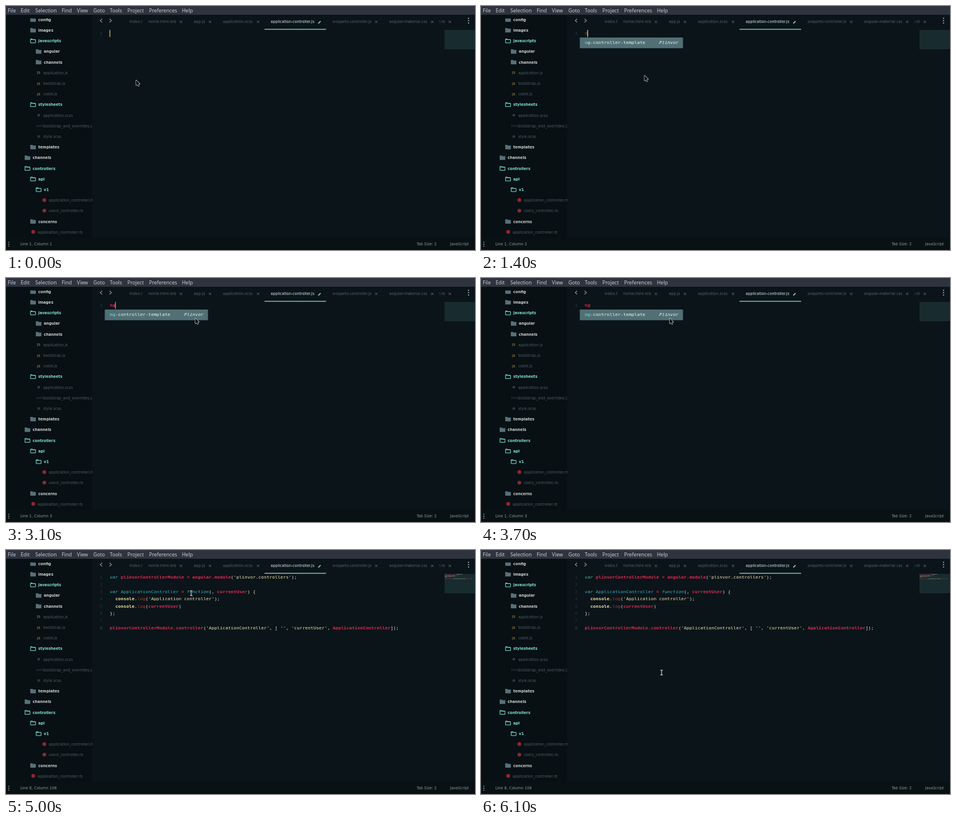
An HTML page with a canvas that plays this animation: 800x418 px, repeating every 6.2 s.

```html
<!DOCTYPE html>
<html lang="en">
<head>
<meta charset="utf-8">
<title>Editor snippet</title>
<style>
html, body { margin: 0; width: 100%; height: 100%; overflow: hidden; background: #0b1419; }
canvas { display: block; width: 800px; height: 418px; }
</style>
</head>
<body>
<canvas id="stage" width="800" height="418"></canvas>
<script>
const ctx = document.getElementById('stage').getContext('2d');
const LOOP = 6200;
const TYPE_N = 1400, TYPE_G = 1500, EXPAND = 4600;
const UI = '"DejaVu Sans", sans-serif';
const MENU = '"Noto Sans", sans-serif';
const MONO = '"DejaVu Sans Mono", monospace';
const CODE_X = 177, CODE_Y = 49.4, LINE = 12.3, CHAR = 4.695;
const TEAL = '#80e0cc', MUTED = '#505e63', LABEL = '#c9d0d1';

function rect(x, y, w, h, color) {
  ctx.fillStyle = color;
  ctx.fillRect(x, y, w, h);
}

function dot(x, y, r, color) {
  ctx.fillStyle = color;
  ctx.beginPath();
  ctx.arc(x, y, r, 0, Math.PI * 2);
  ctx.fill();
}

function path(points, color, width = 1, closed = false) {
  ctx.strokeStyle = color;
  ctx.lineWidth = width;
  ctx.beginPath();
  points.forEach(([x, y]) => ctx.lineTo(x, y));
  if (closed) ctx.closePath();
  ctx.stroke();
}

// Type is set at ten times its size and scaled back, so advances stay fractional.
// The tiny turn switches off hinting and keeps the true x-height and baseline.
function text(str, x, y, color, size, family = UI, style = '') {
  ctx.save();
  ctx.translate(x, y);
  ctx.rotate(0.0004);
  ctx.scale(0.1, 0.1);
  ctx.font = `${style} ${size * 10}px ${family}`;
  ctx.fillStyle = color;
  ctx.fillText(str, 0, 0);
  ctx.restore();
}

function clipped(x, y, w, h, draw) {
  ctx.save();
  ctx.beginPath();
  ctx.rect(x, y, w, h);
  ctx.clip();
  draw();
  ctx.restore();
}

function code(str, x, y, color, style) {
  text(str, x, y, color, 7.8, MONO, style);
}

/* ---------- menu, sidebar, tabs ---------- */

const menu = [['File', 3], ['Edit', 25], ['Selection', 50], ['Find', 95], ['View', 121],
  ['Goto', 149], ['Tools', 177], ['Project', 207], ['Preferences', 244], ['Help', 300]];

function drawMenu() {
  rect(0, 0, 800, 15, '#2e333e');
  menu.forEach(([s, x]) => text(s, x, 11, '#c8ccd4', 8.6, MENU));
}

// kind, label, label x
const tree = [
  ['dir', 'config', 55], ['dir', 'images', 55], ['open', 'javascripts', 55],
  ['dir', 'angular', 64.5], ['dir', 'channels', 64.5],
  ['js', 'application.js', 63.5], ['js', 'bootstrap.js', 63.5], ['js', 'cable.js', 63.5],
  ['open', 'stylesheets', 55], ['scss', 'application.scss', 63.5],
  ['css', 'bootstrap_and_overrides.css', 63.5], ['scss', 'style.scss', 63.5],
  ['dir', 'templates', 55], ['dir', 'channels', 45.5], ['open', 'controllers', 45.5],
  ['open', 'api', 55], ['open', 'v1', 64.5],
  ['rb', 'application_controller.rb', 73], ['rb', 'users_controller.rb', 73],
  ['dir', 'concerns', 55], ['rb', 'application_controller.rb', 54]
];

function folder(x, y, open) {
  if (open) {
    path([[x + .5, y - 3.3], [x + 3.6, y - 3.3], [x + 4.6, y - 2.2], [x + 9, y - 2.2],
      [x + 9, y + 3.3], [x + .5, y + 3.3]], TEAL, 1, true);
    rect(x + 1, y - 2.6, 7.6, .9, TEAL);
  } else {
    rect(x, y - 3.8, 4.2, 2, '#58727a');
    rect(x, y - 2.7, 9.5, 6.4, '#58727a');
  }
}

const icons = {
  dir: (x, y) => folder(x - 13.6, y, false),
  open: (x, y) => folder(x - 13.6, y, true),
  js: (x, y) => text('JS', x - 10.6, y + 2, '#c09a55', 6, UI),
  scss: (x, y) => dot(x - 7.6, y, 2.4, '#2c393e'),
  css: (x, y) => text('{css}', x - 12.4, y + 1.4, '#4a585d', 4.4, UI),
  rb: (x, y) => dot(x - 7.6, y - .4, 3.2, '#922538')
};

function drawSidebar() {
  rect(0, 15, 147, 382, '#081013');
  clipped(0, 21.6, 147, 376, () => tree.forEach(([kind, label, x], i) => {
    const y = 23.4 + i * 18.2;
    const isDir = kind === 'dir' || kind === 'open';
    icons[kind](x, y);
    text(label, x, y + 2.4, kind === 'open' ? TEAL : isDir ? LABEL : MUTED, 6.35, UI, isDir ? 'bold' : '');
  }));
}

const tabs = [['home.html.erb', 243, 298.5], ['app.js', 320.5, 348], ['application.scss', 370, 430],
  ['snippets-controller.js', 557, 631.5], ['angular-material.css', 653.5, 727]];

function cross(x) {
  path([[x - 2, 25.2], [x + 2, 29.2]], '#64757b', .9);
  path([[x + 2, 25.2], [x - 2, 29.2]], '#64757b', .9);
}

function drawTabs() {
  const tab = (s, x, color = '#52646b') => text(s, x, 29.4, color, 6.38);
  path([[164, 21.8], [160.8, 25], [164, 28.2]], '#8b999d', 1.2);
  path([[176.6, 21.8], [179.8, 25], [176.6, 28.2]], '#8b999d', 1.2);
  clipped(211, 18, 21.5, 20, () => tab('index.html', 211));
  tabs.forEach(([s, x, close]) => { tab(s, x); cross(close); });
  clipped(738.8, 18, 12, 20, () => tab('r.rb', 738));
  cross(757);
  tab('application-controller.js', 451.5, '#e6ecec');
  path([[532.8, 29.8], [536.6, 26]], TEAL, 1.7);
  rect(441, 39.2, 105, 1.4, '#7fd0c2');
  [21, 25, 29].forEach(y => dot(789, y, 1.1, '#a9b5b9'));
}

function drawStatus(t) {
  const pos = t < TYPE_N ? 'Line 1, Column 1' : t < TYPE_G ? 'Line 1, Column 2'
    : t < EXPAND ? 'Line 1, Column 3' : 'Line 8, Column 106';
  rect(0, 397, 800, 21, '#091115');
  [404.6, 408, 411.4].forEach(y => dot(4.8, y, .9, '#98a4a8'));
  text(pos, 24.5, 410.3, '#8c989c', 6.38);
  text('Tab Size: 2', 700.5, 410.3, '#8c989c', 6.38);
  text('JavaScript', 757.5, 410.3, '#8c989c', 6.38);
}

/* ---------- code ---------- */

const styles = {
  k: ['#42b3c2', 'italic'], f: ['#3fabbb', ''], r: ['#d92a4e', 'bold'], o: ['#d92a4e', 'bold'],
  s: ['#ece6a9', ''], c: ['#ece29c', 'bold'], m: ['#a93a38', ''], p: ['#dfe4e2', '']
};

const lines = [
  [['k', 'var '], ['r', 'plinvorControllerModule '], ['o', '= '], ['r', 'angular.module'], ['p', '('],
    ['s', "'plinvor.controllers'"], ['p', ');']],
  [],
  [['k', 'var '], ['f', 'ApplicationController '], ['o', '= '], ['k', 'function'], ['p', '(, '],
    ['r', 'currentUser'], ['p', ') {']],
  [['p', '  '], ['c', 'console'], ['p', '.'], ['m', 'log'], ['p', '('],
    ['s', "'Application controller'"], ['p', ');']],
  [['p', '  '], ['c', 'console'], ['p', '.'], ['m', 'log'], ['p', '('], ['r', 'currentUser'], ['p', ')']],
  [['p', '};']],
  [],
  [['r', 'plinvorControllerModule.controller'], ['p', '('], ['s', "'ApplicationController'"], ['p', ', [ '],
    ['s', "''"], ['p', ', '], ['s', "'currentUser'"], ['p', ', '], ['r', 'ApplicationController'], ['p', ']);']]
];

function eachToken(draw) {
  lines.forEach((line, row) => {
    let col = 0;
    line.forEach(([kind, str]) => {
      draw(str, col, row, ...styles[kind]);
      col += str.length;
    });
  });
}

function drawMinimap(t) {
  rect(748, 41, 52, 33, '#182c2f');
  if (t < EXPAND) return;
  ctx.globalAlpha = .5;
  eachToken((str, col, row, color) => {
    const word = str.trim();
    const lead = str.length - str.trimStart().length;
    if (word) rect(748 + (col + lead) * .45, 41.2 + row * 1.08, word.length * .45, .75, color);
  });
  ctx.globalAlpha = 1;
}

function drawPopup(count) {
  rect(168.5, 54, 176, 18.3, '#517075');
  const label = 'ng-controller-template';
  code(label.slice(0, count), CODE_X, 65.2, TEAL, '');
  code(label.slice(count), CODE_X + count * CHAR, 65.2, '#eef3f3', '');
  code('Plinvor', 304, 65.2, '#eef3f3', 'italic');
}

function drawCaret(t, col, row) {
  const start = t < TYPE_N ? 0 : t < TYPE_G ? TYPE_N : t < EXPAND ? TYPE_G : EXPAND;
  const wave = .5 + 1.2 * Math.cos((t - start) / 900 * Math.PI * 2);
  ctx.globalAlpha = Math.max(0, Math.min(1, wave));
  rect(CODE_X - .4 + col * CHAR, 41 + row * LINE, 1.2, 12, t < TYPE_N ? '#e6c766' : '#e8dcc8');
  ctx.globalAlpha = 1;
}

function drawEditor(t) {
  const expanded = t >= EXPAND;
  const rows = expanded ? lines.length : 1;
  for (let i = 0; i < rows; i++) {
    code(String(i + 1), 160, CODE_Y + i * LINE, i === rows - 1 ? '#2c3d45' : '#25343b', '');
  }
  drawMinimap(t);
  if (expanded) {
    eachToken((str, col, row, color, style) =>
      code(str, CODE_X + col * CHAR, CODE_Y + row * LINE, color, style));
    drawCaret(t, 105, 7);
    return;
  }
  const typed = 'ng'.slice(0, t < TYPE_N ? 0 : t < TYPE_G ? 1 : 2);
  code(typed, CODE_X, CODE_Y, typed.length < 2 ? '#b23338' : '#d0244a', typed.length < 2 ? '' : 'bold');
  drawCaret(t, typed.length, 0);
  if (typed) drawPopup(typed.length);
}

/* ---------- pointer ---------- */

// time, x, y
const track = [[0, 222, 127], [1200, 279, 119], [1600, 279, 119], [2000, 282, 113], [2100, 282, 113],
  [2300, 287, 106], [3100, 323, 69], [3500, 323, 69], [4500, 313, 69], [4700, 314, 71],
  [5000, 316, 74], [6100, 308, 210], [LOOP, 308, 210]];

function pointerAt(t) {
  const i = track.findIndex(k => k[0] > t);
  const [t0, x0, y0] = track[i - 1], [t1, x1, y1] = track[i];
  const u = (t - t0) / (t1 - t0);
  const e = u * u * (3 - 2 * u);
  return [x0 + (x1 - x0) * e, y0 + (y1 - y0) * e];
}

function drawPointer(t) {
  ctx.save();
  ctx.translate(...pointerAt(t));
  ctx.lineJoin = 'round';
  if (t < EXPAND) {
    const arrow = [[0, 0], [0, 9], [2.1, 7.2], [3.5, 10.4], [5, 9.7], [3.6, 6.6], [6.4, 6.4]];
    path(arrow, '#e9eded', 1.1, true);
    ctx.fillStyle = '#0a0d0f';
    ctx.fill();
  } else {
    [['#0a0d0f', 2.6], ['#dfe4e4', 1.1]].forEach(([color, w]) => {
      path([[0, -4], [0, 4]], color, w);
      path([[-2.2, -4], [2.2, -4]], color, w);
      path([[-2.2, 4], [2.2, 4]], color, w);
    });
  }
  ctx.restore();
}

function frame(now) {
  const t = now % LOOP;
  rect(0, 0, 800, 418, '#0b1419');
  drawSidebar();
  drawTabs();
  drawMenu();
  drawEditor(t);
  drawStatus(t);
  drawPointer(t);
  requestAnimationFrame(frame);
}
requestAnimationFrame(frame);
</script>
</body>
</html>
```
